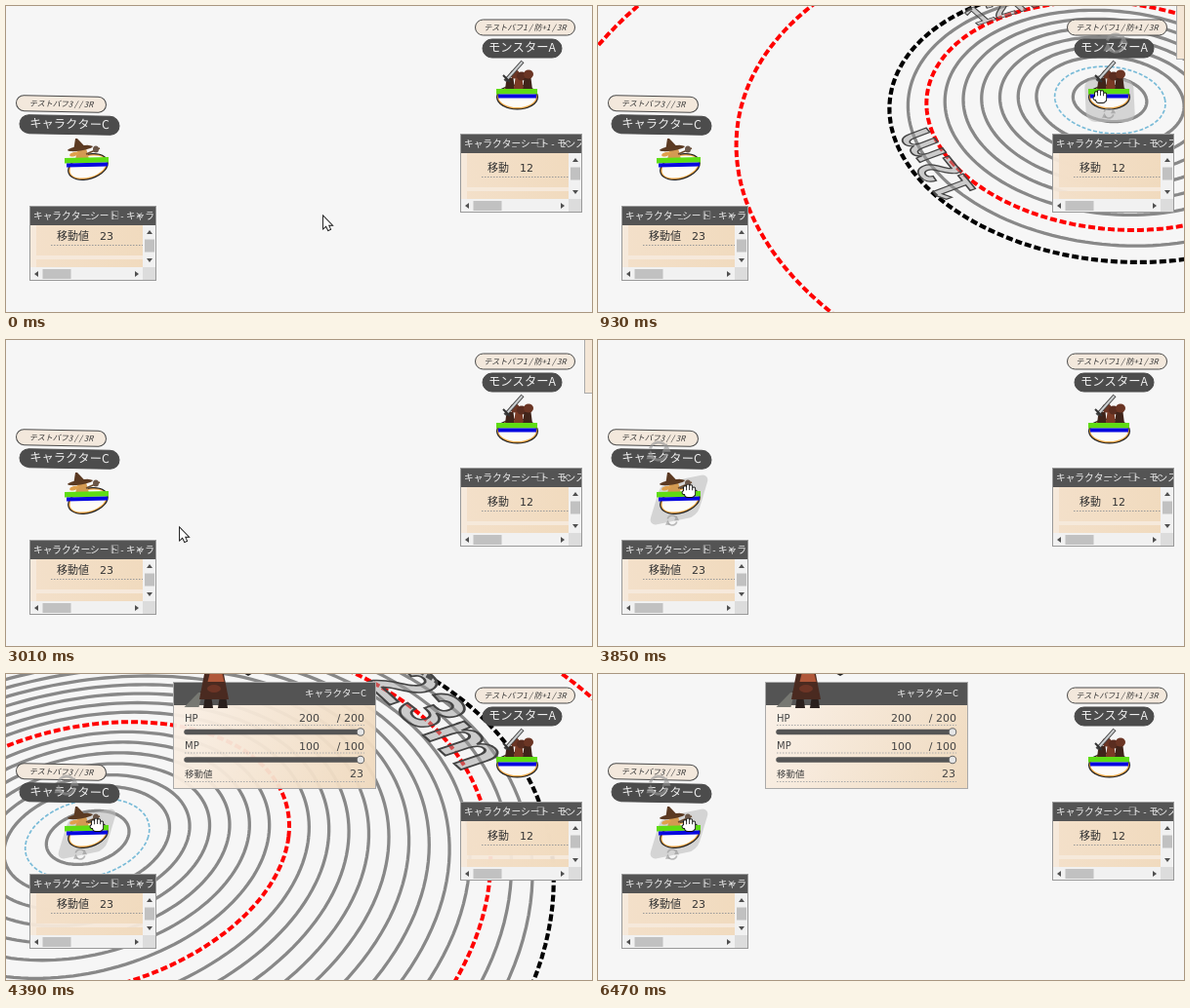
An HTML page with a canvas that plays this animation: 600x314 px, repeating every 6.7 s.

```html
<!DOCTYPE html>
<html lang="ja">
<meta charset="utf-8">
<style>
html,body{margin:0;width:100%;height:100%;overflow:hidden;background:#f6f6f6}
canvas{display:block}
</style>
<canvas id="stage" width="600" height="314"></canvas>
<script>
const ctx = document.getElementById('stage').getContext('2d');
const LOOP = 6700, TAU = Math.PI * 2;
const CJK = '"Noto Sans CJK JP","Noto Sans CJK",sans-serif';
const MIX = '"DejaVu Sans",' + CJK;

// Table plane seen in perspective: horizon height, vanishing x, depth and width factors
const HORIZON = -661, VX = 390, DEPTH = 49900, WIDTH = .0248;
const toGround = (x, y) => [(x - VX) / (WIDTH * (y - HORIZON)), DEPTH / (y - HORIZON)];
const toScreen = (s, d) => [VX + WIDTH * s * DEPTH / d, HORIZON + DEPTH / d];

function text(str, x, y, font, color = '#444', align = 'left') {
  ctx.font = font;
  ctx.fillStyle = color;
  ctx.textAlign = align;
  ctx.fillText(str, x, y);
}
function box(x, y, w, h, color) {
  ctx.fillStyle = color;
  ctx.fillRect(x, y, w, h);
}
function stroke(color, width, dash = []) {
  ctx.setLineDash(dash);
  ctx.strokeStyle = color;
  ctx.lineWidth = width;
  ctx.stroke();
  ctx.setLineDash([]);
}
function line(x1, y1, x2, y2, color, width, dash) {
  ctx.beginPath();
  ctx.moveTo(x1, y1);
  ctx.lineTo(x2, y2);
  stroke(color, width, dash);
}
function oval(x, y, rx, ry, color, tilt = 0) {
  ctx.beginPath();
  ctx.ellipse(x, y, rx, ry, tilt, 0, TAU);
  ctx.fillStyle = color;
  ctx.fill();
}
// Upright tapered shape, centred on x and hanging from y; lean shifts its lower edge
function taper(x, y, top, bottom, h, color, lean = 0) {
  ctx.beginPath();
  ctx.moveTo(x - top / 2, y);
  ctx.lineTo(x + top / 2, y);
  ctx.lineTo(x + lean + bottom / 2, y + h);
  ctx.lineTo(x + lean - bottom / 2, y + h);
  ctx.fillStyle = color;
  ctx.fill();
}
function skewed(x, y, down, across, draw) {
  ctx.save();
  ctx.transform(1, down, across, 1, x, y);
  draw();
  ctx.restore();
}

function ring([s, d], r, color, width, dash) {
  ctx.beginPath();
  for (let i = 0; i <= 180; i++) {
    const a = i / 180 * TAU;
    ctx.lineTo(...toScreen(s + r * Math.cos(a), d - r * Math.sin(a)));
  }
  stroke(color, width, dash);
}
function rings(x, y, range) {
  const g = toGround(x, y);
  for (let r = 2; r < range; r++) if (r != 3 && r % 10) ring(g, r, '#888', 3.3);
  ring(g, 3, '#79bbd8', 1.7, [4, 2]);
  for (let r = 10; r <= 40; r += 10) ring(g, r, '#f00', 4, [7, 3]);
  ring(g, range, '#000', 4.2, [7, 3]);
}
// Outlined distance lying on the table, tangent to the range circle
function rangeLabel([s, d], range, angle) {
  const em = .235 * range, r = .91 * range, h = .05, k = em / 20 / h;
  const c = Math.cos(angle), n = Math.sin(angle);
  const point = (u, v) => toScreen(s + r * c - n * u - c * v, d - (r * n + c * u - n * v));
  const [x, y] = point(0, 0), [ux, uy] = point(h, 0), [vx, vy] = point(0, h);
  ctx.save();
  ctx.transform((ux - x) * k, (uy - y) * k, (vx - x) * k, (vy - y) * k, x, y);
  text(range + 'm', 0, 7.2, 'bold 20px "Liberation Sans",sans-serif', 'rgba(160,160,160,.5)', 'center');
  ctx.lineWidth = .6;
  ctx.strokeStyle = '#444';
  ctx.strokeText(range + 'm', 0, 7.2);
  ctx.restore();
}
function labels(x, y, range) {
  for (let i = 0; i < 4; i++) rangeLabel(toGround(x, y), range, TAU / 6 + i * TAU / 4);
}

function pill(x, y, w, h, slope, fill, str, font, color) {
  skewed(x, y, slope, 0, () => {
    ctx.beginPath();
    ctx.roundRect(0, 0, w, h, h / 2);
    ctx.fillStyle = fill;
    ctx.fill();
    stroke('#4a4a4a', 1);
    text(str, w / 2, h * .68, font, color, 'center');
  });
}
function tags(x, y, slope, buff, buffW, name, nameX, nameW) {
  pill(x, y, buffW, 16, slope, '#f3e8dc', buff, 'italic 8px ' + CJK, '#333');
  pill(nameX, y + 20, nameW, 19, slope, '#4c4c4c', name, '12.3px ' + CJK, '#eee');
}
function turnIcon(x, y, r) {
  const gray = 'rgba(150,150,150,.65)';
  for (const a of [0, Math.PI]) {
    ctx.beginPath();
    ctx.arc(x, y, r, a + .3, a + 2.5);
    stroke(gray, r / 3);
    taper(x + r * Math.cos(a + 2.7), y + r * Math.sin(a + 2.7) - r / 2, 0, r, r, gray);
  }
}
function shade(x, y, down, across) {
  skewed(x, y, down, across, () => {
    ctx.beginPath();
    ctx.roundRect(-25, -22, 50, 44, 9);
    ctx.fillStyle = 'rgba(190,190,190,.6)';
    ctx.fill();
  });
}
function disc(x, y, tilt) {
  ['#222', '#f0a848', '#fdfbf8'].forEach((color, i) =>
    oval(x, y, 21.5 - i * 1.2, 13 - i * 1.2, color, tilt));
}
function bars(x, y, w) {
  box(x, y, w, 5.5, '#5fdc14');
  box(x + 2, y + 5.5, w - 3, 4, '#0808e0');
}

function monster(hover) {
  if (hover) shade(524, 97, 0, .05);
  disc(523.5, 93.5, 0);
  for (let i = 0; i < 3; i++) {
    taper(516 + i * 9, 74, 7, 10, 12, i == 1 ? '#7a3a25' : '#40241a');
    oval(521 + i * 7, 70 + i % 2 * 2, 5, 4.5, i == 1 ? '#5a2d20' : '#6b3524');
  }
  line(511, 77, 529, 57, '#444', 4);
  line(513, 75, 528.5, 57.5, '#cdd0d2', 2);
  line(509, 71, 516, 78, '#333', 2);
  bars(502, 85, 42);
  tags(480.5, 14, 0, 'テストバフ1 / 防+1 / 3R', 102, 'モンスターA', 488, 81);
  if (hover) {
    turnIcon(530, 38, 9);
    turnIcon(523, 110, 5);
  }
}
function witch(hover) {
  if (hover) shade(83, 164, -.2, -.3);
  disc(84, 165, -.3);
  taper(78, 146, 8, 14, 11, '#d39a52');
  oval(70, 152, 5, 2, '#e0a04c', -.3);
  line(82, 152, 96, 146, '#6b4a2c', 1.5);
  oval(92, 147, 3, 3.5, '#6a5648');
  oval(76, 146, 13, 2.5, '#5b3a22', -.15);
  taper(72, 136, 2, 13, 10, '#5b3a22', 4);
  skewed(60, 156, -.02, 0, () => bars(0, 0, 45));
  tags(10.5, 91.5, .02, 'テストバフ3 / / 3R', 92, 'キャラクターC', 14, 102);
  if (hover) {
    turnIcon(62, 114, 9);
    turnIcon(76, 185, 5);
  }
}

function arrowHead(x, y, angle) {
  ctx.save();
  ctx.translate(x, y);
  ctx.rotate(angle);
  taper(0, -2, 0, 6, 4, '#505050');
  ctx.restore();
}
function sheet(x, y, w, h, title, row) {
  ctx.save();
  ctx.translate(x, y);
  ctx.beginPath();
  ctx.rect(0, 0, w, h);
  ctx.clip();
  ctx.globalAlpha = .94;
  box(0, 0, w, h, '#f7e9da');
  const tan = ctx.createLinearGradient(7, 0, w, 0);
  tan.addColorStop(0, '#f3dfc8');
  tan.addColorStop(1, '#f0d9bb');
  box(7, 20, w - 21, h - 46, tan);
  box(7, h - 22, w - 21, 8, tan);
  ctx.globalAlpha = 1;
  box(0, 0, w, 20, '#545454');
  text(title, 4, 13.5, '9.7px ' + CJK, '#eee');
  ['_', '□', '×'].forEach((icon, i) => text(icon, w - 72 + i * 25, 13, '9px ' + CJK, '#eee'));
  text(row, 28, h - 42, '11px ' + MIX, '#333');
  line(22, h - 36.5, w - 14, h - 36.5, '#999', 1, [1.5, 1.5]);
  box(w - 14, 20, 14, h - 34, '#f1f1f1');
  box(0, h - 14, w - 14, 14, '#f1f1f1');
  box(w - 14, h - 14, 14, 14, '#dcdcdc');
  box(w - 12, 34.5, 10, 13, '#c1c1c1');
  box(13.5, h - 12, 29, 10, '#c1c1c1');
  arrowHead(w - 7, 27, 0);
  arrowHead(w - 7, h - 21, TAU / 2);
  arrowHead(7, h - 7, -TAU / 4);
  arrowHead(w - 20, h - 7, TAU / 4);
  ctx.strokeStyle = '#999';
  ctx.strokeRect(.5, .5, w - 1, h - 1);
  ctx.restore();
}

function sweeper() {
  line(206, 10, 198, 22, '#3c2c24', 2);
  taper(199, 19, 4, 15, 15, '#777872', -9);
  for (const x of [207, 222]) taper(x, 22, 6, 10, 13, '#2a201d');
  taper(213, 0, 20, 30, 26, '#4a2a20');
  taper(215, 0, 13, 17, 8, '#b0583a');
  oval(213, 15, 7, 4, '#6d3526');
  taper(248, 0, 7, 0, 2, '#222');
}
function popup(alpha) {
  ctx.save();
  ctx.globalAlpha = alpha * .95;
  const paper = ctx.createLinearGradient(171, 32, 378, 118);
  paper.addColorStop(0, '#faf0e6');
  paper.addColorStop(1, '#efd9bd');
  box(171, 8, 207, 110, paper);
  ctx.globalAlpha = alpha;
  box(171, 8, 207, 24, '#545454');
  ctx.strokeStyle = '#aaa';
  ctx.lineWidth = 1;
  ctx.strokeRect(171.5, 8.5, 207, 109);
  text('キャラクターC', 369, 22.5, '9.5px ' + CJK, '#eee', 'right');
  [['HP', 200], ['MP', 100]].forEach(([label, value], i) => {
    const y = 49 + i * 28.5;
    text(label, 183, y - .5, '10px ' + MIX);
    text(value, 321, y, '11px ' + MIX, '#444', 'right');
    text('/ ' + value, 367, y, '11px ' + MIX, '#444', 'right');
    line(183, y + 3.5, 367, y + 3.5, '#aaa', 1, [1.5, 1.5]);
    ctx.lineCap = 'round';
    line(185, y + 10.5, 364, y + 10.5, '#555', 5.5);
    ctx.lineCap = 'butt';
    oval(363, y + 10.5, 4.2, 4.2, '#666');
    oval(363, y + 10.5, 3.2, 3.2, '#e6e6e6');
  });
  text('移動値', 183, 105.5, '9.5px ' + CJK);
  text(23, 366, 106, '11px ' + MIX, '#444', 'right');
  line(183, 110.5, 367, 110.5, '#aaa', 1, [1.5, 1.5]);
  sweeper();
  ctx.restore();
}
function edgePopup(alpha) {
  ctx.globalAlpha = alpha;
  box(592, 0, 8, 54, '#f4e6d6');
  line(592.5, 0, 592.5, 54, '#aaa', 1);
  line(592, 54.5, 600, 54.5, '#aaa', 1);
  ctx.globalAlpha = 1;
}

const ARROW = new Path2D('M0 0V12L2.8 9.5 5 14 7 13 5 8.8H8.6Z');
const HAND = new Path2D();
for (let i = 0; i < 4; i++) HAND.roundRect(i * 3 - 5, -3 - 2.5 * Math.sin(i + .3), 2.2, 8, 1);
HAND.roundRect(-6.5, 1, 4, 3, 1.5);
HAND.roundRect(-4, 0, 9.5, 7, 3);
function pointer(x, y, shape) {
  ctx.save();
  ctx.translate(x, y);
  ctx.strokeStyle = '#111';
  ctx.lineWidth = 1.8;
  ctx.stroke(shape);
  ctx.fillStyle = '#fff';
  ctx.fill(shape);
  ctx.restore();
}

// Progress from a to b in n hard steps, the first one at a
const steps = (t, a, b, n) =>
  t < a ? 0 : Math.min(1, (Math.floor((t - a) / (b - a) * (n - 1) + .02) + 1) / n);
const within = (t, a, b) => t >= a && t < b;
const moves = [
  { from: 80, to: 395, n: 5, x: 514, y: 92 },
  { from: 2770, to: 3010, n: 4, x: 178, y: 193 },
  { from: 3080, to: 3240, n: 3, x: 150, y: 182 },
  { from: 3540, to: 3850, n: 5, x: 93, y: 154 }
];

function draw(t) {
  const near = within(t, 930, 2310), far = within(t, 4390, 6160);
  box(0, 0, 600, 314, '#f6f6f6');
  if (near) rings(524, 95, 12);
  if (far) rings(84, 167, 23);
  monster(within(t, 395, 2160) || within(t, 2390, 2770));
  witch(within(t, 3770, 5850) || t >= 6400);
  if (near) labels(524, 95, 12);
  if (far) labels(84, 167, 23);
  sheet(465, 131, 125, 81, 'キャラクターシート - モンスターA', '移動　12');
  sheet(24, 205, 130, 77, 'キャラクターシート - キャラクターC', '移動値　23');
  if (t < 3240) edgePopup(steps(t, 550, 710, 3));
  popup(steps(t, 4000, 4160, 3));
  let x = 325, y = 216;
  for (const m of moves) {
    const p = steps(t, m.from, m.to, m.n);
    x += (m.x - x) * p;
    y += (m.y - y) * p;
  }
  pointer(x, y, within(t, 395, 2770) || t >= 3770 ? HAND : ARROW);
}
const start = performance.now();
(function tick() {
  draw((performance.now() - start) % LOOP);
  requestAnimationFrame(tick);
})();
</script>
</html>
```
